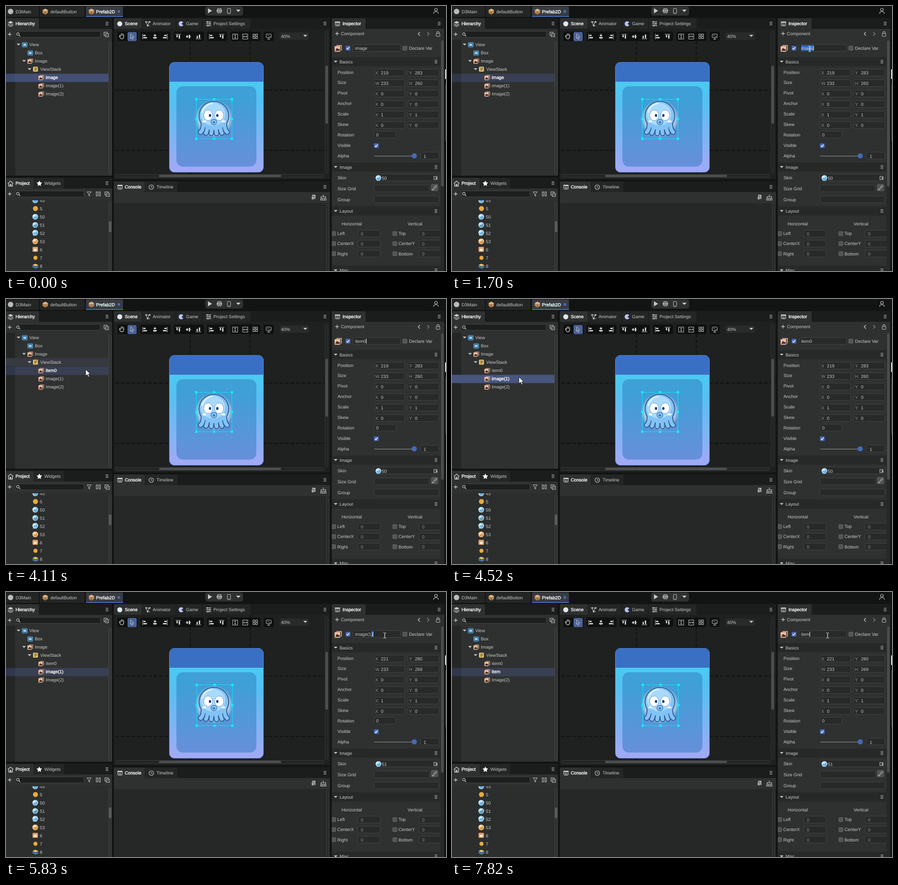
These frames come from a looping animation (963 by 581 pixels, 8000 ms). An HTML page:

```html
<!DOCTYPE html>
<html lang="en">
<head>
<meta charset="utf-8">
<title>Editor</title>
<style>
html, body { margin: 0; width: 100%; height: 100%; overflow: hidden; background: #121313; }
svg { display: block; width: 963px; height: 581px; }
text { font: 9.85px "Liberation Sans", Arial, sans-serif; fill: #c9caca; text-rendering: geometricPrecision; white-space: pre; }
.b { fill: #fff; stroke: #fff; stroke-width: .4px; }
.d { fill: #8b8c8c; }
</style>
</head>
<body>
<svg id="stage" viewBox="0 0 963 581" xmlns="http://www.w3.org/2000/svg"></svg>
<script>
const BODY = '#2f3131', STRIP = '#1b1c1c', TAB = '#242525', DARK = '#1d1e1e', EDGE = '#434545', INK = '#c9caca';
let out = '';
const add = s => { out += s; };

function box(x, y, w, h, fill, r = 0, stroke = '') {
  const o = stroke ? .5 : 0;
  add(`<rect x="${x + o}" y="${y + o}" width="${w - 2 * o}" height="${h - 2 * o}" rx="${r}" fill="${fill}" ${stroke && `stroke="${stroke}"`}/>`);
}
// y is the middle of the line
function label(x, y, s, cls = '', id = '') {
  add(`<text x="${x}" y="${y + 3.5}" class="${cls}" ${id && `id="${id}"`}>${s}</text>`);
}
const line = (d, w = 1.2, c = INK) => add(`<path d="${d}" fill="none" stroke="${c}" stroke-width="${w}"/>`);
const shape = (d, c = INK) => add(`<path d="${d}" fill="${c}"/>`);
const oval = (x, y, rx, ry, c, extra = '') => add(`<ellipse cx="${x}" cy="${y}" rx="${rx}" ry="${ry}" fill="${c}" ${extra}/>`);
const dot = (x, y, r, c) => oval(x, y, r, r, c);
const ring = (x, y, r) => oval(x, y, r, r, 'none', `stroke="${INK}" stroke-width="1.2"`);
const frame = (x, y, w, h, r = 0) => box(x, y, w, h, 'none', r, INK);
const down = (x, y, w = 4) => shape(`M${x - w} ${y - w / 2}h${2 * w}l${-w} ${w}z`);
const field = (x, y, w) => box(x, Math.round(y) - 8, w, 16, '#282a2a', 3, EDGE);
const menu = (x, y) => line(`M${x - 3} ${y - 3}h6m-6 3h6m-6 3h6`, 1);
const plus = (x, y) => line(`M${x - 4} ${y}h8m-4 -4v8`, 1.3);
const uncheck = (x, y) => box(x - 5, y - 5, 10, 10, '#535555', 1, '#686a6a');

function search(y, w) {
  plus(8, y);
  box(20, y - 7, w, 14, DARK, 3, EDGE);
  ring(26, y - .5, 2.8); line(`M28 ${y + 1.5}l3 3`, 1.4);
}
function pages(x, y) {
  frame(x - 5, y - 5, 8, 8); box(x - 2, y - 2, 8, 8, BODY, 0, INK); line(`M${x} ${y + 2}h4`, 1);
}
function cube(x, y) {
  shape(`M${x - 6} ${y - 3}l6 -3 6 3v6l-6 4 -6 -4z`, '#b98650');
  shape(`M${x - 6} ${y - 3}l6 -3 6 3 -6 3z`, '#dcb88a');
  line(`M${x} ${y}v6`, 1, '#5f4227');
}
function tick(x, y) {
  box(x - 5, y - 5, 10, 10, '#4a6dbb', 1);
  line(`M${x - 3} ${y}l2 2.5 4 -5`, 1.4, '#fff');
}
function imageIcon(x, y, k = 1) {
  add(`<g transform="translate(${x} ${y}) scale(${k})">`);
  line('M-3 -4.500h8.500v8.500', 1.2, '#e9b598');
  box(-6, -3.5, 9.5, 9.5, '#f4bd9e', 1);
  shape('M-5 4.500l3 -5 2.500 2.500 1 -1.500 1.500 4z', '#3f2b25');
  add('</g>');
}
function viewIcon(x, y) {
  box(x - 6, y - 5, 12, 11, '#2d5c80', 1, '#69a9d3');
  box(x - 3, y - 2, 6, 5, '#9fd0ee');
  line(`M${x - 6} ${y - 2}h3m6 0h3m-12 4h3m6 0h3`, 1, '#69a9d3');
}
function tabs(x, y, w, list) {
  box(x, y, w, 24, STRIP);
  list.forEach(([tx, tw, inset, s], i) => {
    box(tx, y + 1, tw, 23, i ? TAB : BODY, 2);
    label(tx + inset, y + 12, s, i ? '' : 'b');
  });
  menu(x + w - 11, y + 12.5);
}
function ball(x, y, rim, core) {
  dot(x, y, 6.3, rim); dot(x + .5, y + 1, 4.3, core);
  oval(x - 1.5, y - 2, 3, 1.7, '#fff', 'opacity=".75"');
}
// guide bar with two blocks, k = 0 start, .5 middle, 1 end
function align(x, k, turn) {
  add(`<g transform="translate(${x} 67) rotate(${turn}) ${turn ? 'scale(1 -1)' : ''}">`);
  box(-5.5 + 10 * k, -6, 1, 12, INK);
  [[5, -4], [8, 1]].forEach(([w, y]) => box(-3.5 + 7 * k - w * k, y, w, 3, INK));
  add('</g>');
}

const stops = (...list) => list.map(([o, c, a = 1]) => `<stop offset="${o}" stop-color="${c}" stop-opacity="${a}"/>`).join('');
const fade = (id, ...list) => add(`<linearGradient id="${id}" x1="0" y1="0" x2="0" y2="1">${stops(...list)}</linearGradient>`);
add('<defs>');
fade('card', [.2, '#4bc9f2'], [.38, '#57bff2'], [1, '#a3a9f6']);
fade('inner', [.15, '#3f9fd7'], [1, '#678fda']);
add(`<radialGradient id="glow">${stops([.78, '#c9dfef', .8], [.9, '#b4d0e6', .5], [1, '#a8cdea', 0])}</radialGradient>
<clipPath id="listClip"><rect y="426" width="232" height="155"/></clipPath>
<clipPath id="propClip"><rect x="713" y="74" width="238" height="507"/></clipPath></defs>`);
box(0, 0, 963, 581, '#121313');

// Top bar
box(0, 1, 72, 23, TAB, 2); box(74, 1, 98, 23, TAB, 2); box(175, 1, 81, 23, '#383b40', 2);
box(175, 22, 81, 2, '#3f6db5');
dot(10, 12, 6, '#b9baba'); label(21, 12, 'D3Main');
cube(86, 12); label(97, 12, 'defaultButton');
cube(187, 12); label(197, 12, 'Prefab2D', 'b'); dot(247, 12, 3, '#456bb5');
box(436, 1, 83, 20, BODY, 5);
shape('M442 5l9 5.500 -9 5.500z');
dot(467, 10.5, 6, INK);
line('M461 8.300h12m-12 4.500h12m-6 -8v13', .8, BODY); oval(467, 10.5, 2.8, 6, 'none', `stroke="${BODY}" stroke-width=".8"`);
frame(484, 5, 8, 12, 1); line('M487 14.500h2', 1);
down(508.5, 10.5, 5);
ring(941, 8, 3); line('M936 17v-1.500q0 -3 5 -3t5 3v1.500');

// Hierarchy
box(0, 26, 232, 346, BODY);
tabs(0, 26, 232, [[0, 72, 21, 'Hierarchy']]);
shape('M4 36l6 -3 6 3 -6 3z'); line('M4 39l6 3 6 -3m-12 3l6 3 6 -3', 1.3);
search(62, 187); pages(219, 62);
box(0, 74, 20, 298, '#242626');
add('<rect id="hover" width="225" height="18" fill="#373a41"/><rect id="pick" width="225" height="18" fill="#637fda"/>');
box(224, 78, 7, 293, '#333535', 3, '#454747');
const rowY = i => 84.5 + 18 * i;
viewIcon(41, rowY(0)); label(51, rowY(0), 'View');
viewIcon(53, rowY(1)); label(63, rowY(1), 'Box');
imageIcon(53, rowY(2)); label(63, rowY(2), 'Image');
box(59, 133, 11, 11, '#e0bd66', 2); line('M62 136h6m-6 2.500h6m-6 2.500h4', 1, '#4e3a19');
label(75, rowY(3), 'ViewStack');
[0, 2, 3].forEach((row, i) => down(27.5 + 12 * i, rowY(row)));
['image', 'image(1)', 'Image(2)'].forEach((s, i) => { imageIcon(77, rowY(4 + i)); label(87, rowY(4 + i), s, '', 'node' + i); });

// Project
box(0, 376, 232, 205, BODY);
tabs(0, 376, 232, [[0, 61, 21, 'Project'], [62, 65, 22, 'Widgets']]);
line('M4 389l6 -5 6 5m-10 0v6h8v-6', 1.5); shape('M8.500 390h3v5h-3z');
shape('M73 383l2 3.600 4 .7 -3 3 .6 4.200 -3.600 -2 -3.700 2 .7 -4.200 -3 -3 4 -.7z', '#fff');
search(412, 151); pages(221, 412);
line('M177.500 407.500h9l-3.500 4.500v5l-2 -1.500v-3.500z', 1);
frame(197, 407, 4, 10); frame(203, 407, 4, 10);
box(0, 425, 232, 156, '#2c2e2e');
box(224, 428, 7, 160, '#303232', 3, '#3d3f3f'); box(225, 472, 6, 24, '#595b5b', 3);
const bubble = (x, y) => ball(x, y, '#b4dcf2', '#67b2e2');
const coin = r => y => dot(64.5, y, r, '#eaa93e');
const assets = {
  '45 ': y => bubble(64, y),
  '5 ': coin(5.5),
  '50 ': y => bubble(64, y),
  '51 ': y => ball(64, y, '#a5d3e8', '#5d9fc4'),
  '52 ': y => {
    bubble(64, y - 1);
    for (let x = 60; x <= 68; x += 2.7) line(`M${x} ${y + 2}v3.500`, 1.5, '#b4dcf2');
  },
  '53 ': y => ball(64, y, '#f2c58b', '#df9a4c'),
  '6 ': y => { box(58, y - 6, 12, 11, '#e39b62', 2); box(61, y - 2, 6, 5, '#fff1dc', 1); },
  '7 ': coin(4.5),
  '8 ': y => { shape(`M58 ${y - 2}l6 -3 7 3 -6 3z`, '#ecc45f'); shape(`M58 ${y - 1}l7 3 6 -3v4l-6 3 -7 -3z`, '#3d78bd'); }
};
add('<g clip-path="url(#listClip)">');
Object.entries(assets).forEach(([name, icon], i) => {
  const y = 426 + 18 * i;
  icon(y);
  label(74, y, name.trim());
});
add('</g>');

// Scene
box(236, 26, 473, 354, '#1f2020');
tabs(236, 26, 473, [[236, 61, 24, 'Scene'], [298, 73, 23, 'Animator'], [373, 56, 21, 'Game'], [431, 104, 23, 'Project Settings']]);
dot(249, 39, 5.5, '#dfe9f3');
line('M306 35h9m-8 2l3 6h5m-2 -7l-3 6', 1.1); dot(306.5, 35, 1.8, INK); dot(314.5, 35, 1.8, INK); dot(310, 43, 1.8, INK);
shape('M388 36a5.500 5.500 0 1 0 0 6l-4 -3z', '#b7c3f0');
line('M438 35h11m-11 4h11m-11 4h11m-8 -10v4m5 0v4m-4 0v4', 1.3);
add('<path d="M403.500 52V368M534.500 52V368M239 184.500H698M239 316.500H698" stroke="#080909" stroke-width="1.3" stroke-dasharray="8 4"/>');

const hand = x => line(`M${x - 4} 67l-2 -2m2 2v-4m2.500 2v-5m2.500 5v-5m2.500 6v-4m-9.500 3l2.500 6q3 2 6 0l1.500 -5`, 1.3);
const select = x => { box(x - 9, 57, 20, 20, '#4a6397', 3); line(`M${x - 2} 61l7 7h-4l2 4 -2 1 -2 -4 -2 2z`, 1); };
const stretch = turn => x => {
  add(`<g transform="translate(${x + .5} 67) rotate(${turn})">`);
  frame(-6, -6, 12, 12); line('M0 -4v8m-2 -6l2 -2 2 2m-4 4l2 2 2 -2', 1);
  add('</g>');
};
const grid = x => { for (let i = 0; i < 4; i++) frame(x - 5 + 6 * (i % 2), 61 + 6 * (i >> 1), 5, 5); };
const screen = x => { frame(x - 5, 61, 12, 9, 1); line(`M${x + 1} 70v3m-3 0h6m-6 -8h3m1 2h3`, 1); };
const alignSet = turn => [0, .5, 1].map(k => x => align(x, k, turn));
let gx = 244;
[[hand, select], alignSet(0), alignSet(90), [x => align(x, 0, 0), x => align(x, 0, 90)], [stretch(0), stretch(90), grid], [screen]].forEach(group => {
  box(Math.floor(gx), 56, group.length * 22, 21, '#0f1010', 4);
  group.forEach((icon, i) => icon(Math.floor(gx + 10 + 21.7 * i)));
  gx += group.length * 22.2 + 6.4;
});
box(599, 58, 64, 16, '#292b2b', 3); label(602, 66, '40%'); down(655, 65.5, 4.5);

box(357, 123, 207, 242, 'url(#card)', 11, '#5484d4');
shape('M358 166v-32q0 -10 10 -10h185q10 0 10 10v32z', '#3970c3');
box(373, 176, 175, 176, 'url(#inner)', 14);

// Octopus: the same body twice, first as a dark rim
function octopus(color, grow) {
  for (let k = -1; k < 1.1; k += .4) {
    const x = 455 + 23 * k, end = 455 + 29 * k;
    add(`<path d="M${x} 258Q${x} 272 ${end} ${279.5 - 3 * k * k}" fill="none" stroke="${color}" stroke-width="${8 + 2 * grow}" stroke-linecap="round"/>`);
  }
  oval(455, 241, 31.5 + grow, 31 + grow, color);
}
dot(455, 247, 41.5, 'url(#glow)');
octopus('#35598f', 2);
octopus('#82c3f6', 0);
oval(453, 237, 27, 25, '#a9dafb');
line('M429 234Q434 216 452 213', 3, '#e2f4ff');
[-1, 1].forEach(side => {
  const x = 454.5 + 12 * side;
  oval(x, 239.5, 9.8, 11.5, '#fff', 'stroke="#5d94cf" stroke-width=".9"');
  oval(x - 4 * side, 240, 2.6, 3.2, '#24427b');
  oval(455 + 21 * side, 253, 4.5, 2.6, '#fff', 'opacity=".85"');
});
oval(455, 254.5, 6.5, 6, '#8accf9', 'stroke="#3e70b3" stroke-width="1.4"');
oval(455, 255, 3, 2.6, '#4379c0');
add('<g id="gizmo"></g>');

box(239, 369, 458, 7, '#222424', 3, '#3d3f3f'); box(335, 370, 267, 5, '#4c4e4e', 2);
box(698, 54, 7, 314, '#222424', 3, '#343636'); box(699, 131, 6, 127, '#4c4e4e', 3);

// Console
box(236, 384, 473, 197, '#262828');
tabs(236, 384, 473, [[236, 68, 24, 'Console'], [305, 70, 24.5, 'Timeline']]);
const sheet = (x, y) => { frame(x, y, 11, 10, 1); box(x, y, 11, 3, INK); line(`M${x + 2} ${y + 5.5}h7m-7 2.500h7`, 1); };
sheet(244, 392);
ring(318, 397, 5); line('M318 394v3.500h2.500', 1.1);
box(236, 408, 473, 24, BODY);
box(670, 414, 7, 9, INK); box(668, 416, 7, 9, '#9fa1a1', 0, BODY);
line('M694.500 413.500v4m-5 4v-3.500h10v3.500m-10 0h10l1 4h-12zm3 1v3m4 -3v3', 1.2);
box(701, 433, 6, 150, '#292b2b', 3, '#3b3d3d');

// Inspector
box(713, 26, 238, 555, BODY);
tabs(713, 26, 246, [[713, 74, 23.5, 'Inspector']]);
sheet(720, 34);
box(713, 50, 246, 24, BODY);
plus(724.5, 60.5); label(733, 60.5, 'Component');
line('M906 57l-4 4 4 4', 1.4); line('M922 57l4 4 -4 4', 1.4, '#868888');
frame(941, 60, 9, 7, 1); line('M943 60v-2q2.500 -4 5 0v2', 1.2);
box(951, 74, 8, 507, '#272929'); box(952, 75, 6, 321, '#4a4c4c', 3);

add('<g clip-path="url(#propClip)">');
imageIcon(727, 92.5, 1.3); tick(748.5, 92.5); field(759, 92, 105); uncheck(873, 92.5); label(882, 92.5, 'Declare Var');
add('<rect id="mark" y="86" height="12" fill="#2d6ac1"/>');
label(764, 92.5, 'image', '', 'name');
add('<rect id="caret" y="87" width="1" height="11" fill="#eee"/>');
Object.entries({ Basics: 122, Image: 353, Layout: 449.5, Misc: 579.5 }).forEach(([s, y]) => {
  box(713, y - 10, 238, 20, '#272929');
  down(721.5, y); label(730, y, s); menu(941, y);
});
const propY = i => 145 + 22.9 * i;
['Position', 'Size', 'Pivot', 'Anchor', 'Scale', 'Skew', 'Rotation', 'Visible', 'Alpha'].forEach((s, i) => {
  const y = propY(i) + 1;
  label(725.5, y - 1, s);
  if (i > 5) return;
  field(805, y, 68); field(879, y, 69);
  label(808, y + .5, i == 1 ? 'W' : 'X', 'd'); label(820.5, y + .5, s == 'Scale' ? 1 : 0, '', 'a' + i);
  label(882, y + .5, i == 1 ? 'H' : 'Y', 'd'); label(895, y + .5, s == 'Scale' ? 1 : 0, '', 'b' + i);
});
field(805, propY(6), 49); label(810, propY(6), '0');
tick(810.5, propY(7) + 1);
box(806, 328, 86, 2, '#67696a'); dot(893.5, 328.5, 5.7, '#4769b0'); field(907, 328, 41); label(914, 329, '1');
['Skin', 'Size Grid', 'Group'].forEach((s, i) => {
  const y = 376 + 24 * i;
  label(725.5, y, s);
  field(805, y + .4, i == 1 ? 122 : 143);
});
bubble(815, 377); label(822.5, 377, '50', '', 'skin');
frame(936, 373, 8, 8); shape('M939 376h5v5z');
box(930, 390, 16, 16, '#505252', 3); line('M941 393l-4 5 2 1 4 -4zm-5 6q-1 4 -4 4 4 1 6 -2', 1);
label(734.5, 477, 'Horizontal'); label(879, 477, 'Vertical');
[['Left', 'Top'], ['CenterX', 'CenterY'], ['Right', 'Bottom']].forEach((pair, i) => pair.forEach((s, col) => {
  const y = 498.5 + 22.3 * i, x = 717 + 134 * col;
  uncheck(x, Math.round(y)); label(x + 8, y, s); field(x + 52.5, y, 50); label(x + 59.5, y + .5, '0', 'd');
}));
add('</g>');
box(961, 139, 2, 21, '#e8e8e8'); box(962, 171, 1, 125, '#285aa0');

// Pointer
add('<path id="arrow" d="M.500 0V14.500L4 11.300 6.500 16.800 8.800 15.800 6.400 10.500H11z" fill="#fff" stroke="#111" stroke-width=".9"/>');
add('<path id="beam" d="M-3 -5.500h2.300M.700 -5.500H3M0 -5v10.500M-3 6h2.300M.700 6H3" fill="none" stroke="#eee" stroke-width="1.2"/>');

document.getElementById('stage').innerHTML = out;
const el = id => document.getElementById(id);
const set = (id, o) => { for (const k in o) el(id).setAttribute(k, o[k]); };
const write = (id, s) => { el(id).textContent = s; };
const show = (id, on) => set(id, { visibility: on ? 'visible' : 'hidden' });

const PRESS = 880, DOUBLE = 1020, TYPE = 2300, ZERO = 2830, PICK = 4390, LOAD = 4590, PRESS2 = 5700, ALL = 6630, TYPE2 = 7750, LAG = 70;
// start, end, x, y of each pointer move
const moves = [[70, 810, 808, 94], [1580, 1700, 783, 94], [3300, 3430, 790, 96], [3580, 4110, 174, 154], [4110, 4320, 152, 184],
  [PICK - 70, 4520, 146, 171], [4700, 5600, 838, 96], [5600, 5830, 829, 95], [6320, 6440, 822, 95]];

// sideways motion eases out, vertical motion is even, which bends the path
function pointer(t) {
  let x = 938, y = 582;
  for (const [from, to, nx, ny] of moves) {
    const k = Math.min(1, Math.max(0, (t - from) / (to - from)));
    x += (nx - x) * (1 - (1 - k) ** 2);
    y += (ny - y) * k;
  }
  return [x, y];
}
function nameAt(t) {
  if (t < TYPE) return 'image';
  if (t < ZERO) return 'item';
  if (t < LOAD) return 'item0';
  return t < TYPE2 ? 'image(1)' : 'item';
}
function selection(t) {
  if (t >= DOUBLE && t < TYPE) return [764, 791.5];
  if (t >= PRESS2 + LAG && t < TYPE2) return [t < ALL ? 800 : 764, 803.5];
  return [0, 0];
}
function gizmo(x, y, w, h) {
  let s = `<rect x="${x}" y="${y}" width="${w}" height="${h}" fill="none" stroke="#12e4f4"/>`;
  for (let i = 0; i < 9; i++) if (i != 4)
    s += `<rect x="${x - 2.5 + w / 2 * (i % 3)}" y="${y - 2.5 + h / 2 * Math.floor(i / 3)}" width="5" height="5" fill="#0cf3fb"/>`;
  el('gizmo').innerHTML = s;
}

function draw(t) {
  const [x, y] = pointer(t);
  const inField = x > 759 && x < 864 && y > 84 && y < 101;
  show('arrow', !inField && t >= 70); show('beam', inField);
  for (const id of ['arrow', 'beam']) set(id, { transform: `translate(${x} ${y})` });

  const [hx, hy] = pointer(t - 80);
  const row = Math.floor((hy - 75.5) / 18);
  show('hover', hx < 225 && row >= 0 && row < 7);
  set('hover', { y: 75.5 + row * 18 });

  const second = t >= PICK, loaded = t >= LOAD;
  const treeFocus = t < PRESS || (second && t < PRESS2);
  set('pick', { y: second ? 166.5 : 148.5, opacity: treeFocus ? .4 : .2 });
  write('node0', second ? 'item0' : nameAt(t < ZERO ? t - LAG : t - 2 * LAG));
  write('node1', t < TYPE2 + LAG ? 'image(1)' : 'item');
  set('node0', { class: second ? '' : 'b' });
  set('node1', { class: second ? 'b' : '' });

  write('name', nameAt(t));
  const [from, to] = selection(t);
  set('mark', { x: from, width: to - from });
  show('caret', (t >= PRESS && t < PICK) || t >= PRESS2);
  set('caret', { x: 764 + el('name').getComputedTextLength() });

  write('a0', loaded ? 221 : 219); write('b0', loaded ? 280 : 283);
  write('a1', 233); write('b1', loaded ? 269 : 260);
  write('skin', loaded ? 51 : 50);
  gizmo(loaded ? 417.5 : 416.5, loaded ? 203.5 : 204.5, 78, loaded ? 89.5 : 86.5);
}

const start = performance.now();
function loop() {
  draw((performance.now() - start) % 8000);
  requestAnimationFrame(loop);
}
draw(0);
requestAnimationFrame(loop);
</script>
</body>
</html>
```
